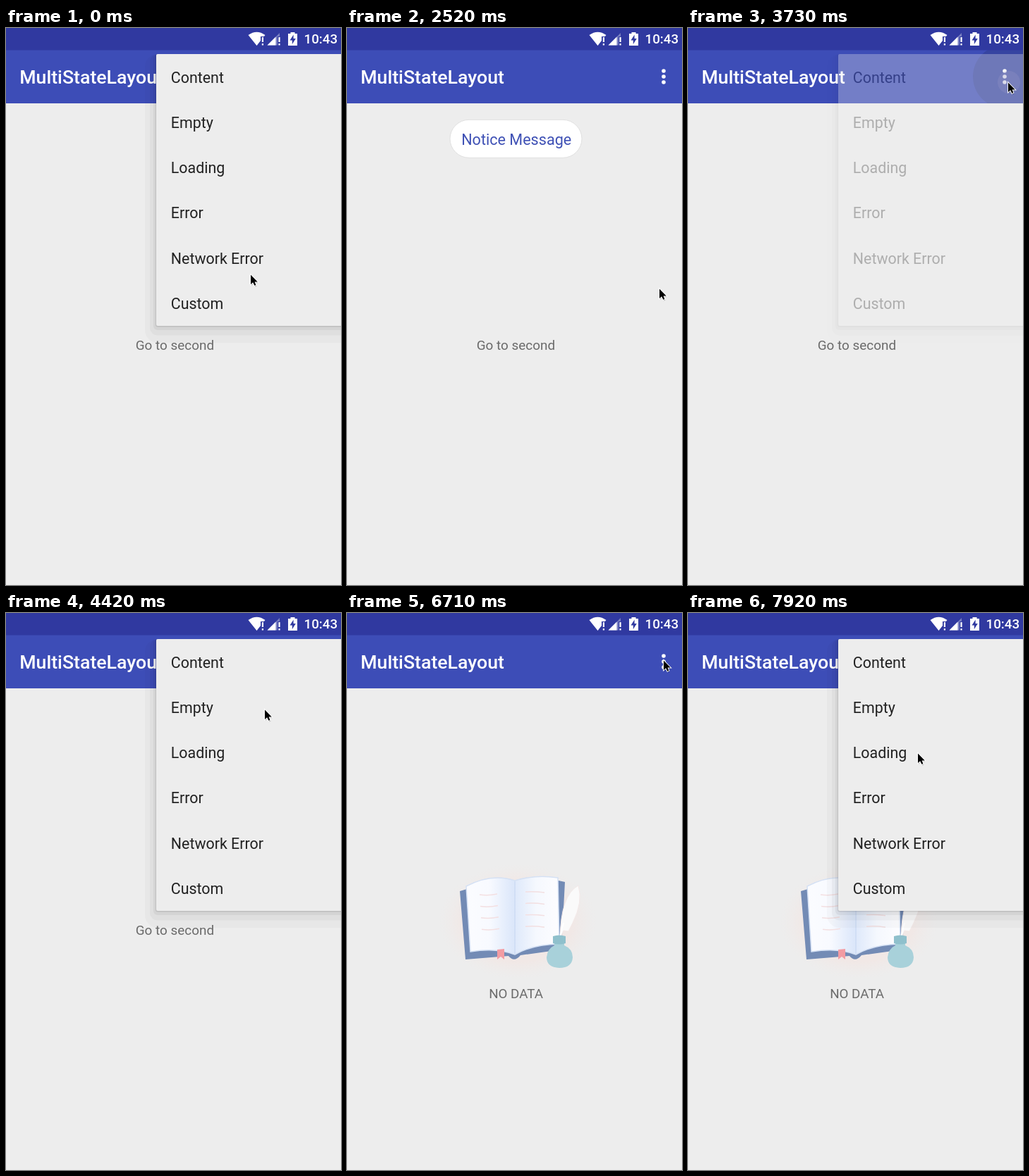
These frames come from a looping animation (475 by 791 pixels, 8 s). An HTML page:

```html
<!DOCTYPE html>
<html lang="en">
<head>
<meta charset="utf-8">
<title>MultiStateLayout</title>
<style>
  html, body { margin: 0; width: 100%; height: 100%; overflow: hidden; background: #ededed; }
  svg { display: block; width: 100%; height: 100%; font-family: Roboto, sans-serif; }
  .mid { text-anchor: middle; }
</style>
</head>
<body>
<svg viewBox="0 0 475 791">
  <defs>
    <radialGradient id="glow">
      <stop offset=".7" stop-color="#f1e8e6"/>
      <stop offset="1" stop-color="#efebea" stop-opacity="0"/>
    </radialGradient>
    <linearGradient id="page">
      <stop offset="0" stop-color="#fbfcff"/>
      <stop offset=".25" stop-color="#f8faff"/>
      <stop offset=".5" stop-color="#dce7fa"/>
      <stop offset=".75" stop-color="#f5f8fe"/>
      <stop offset="1" stop-color="#fdfdff"/>
    </linearGradient>
    <clipPath id="bar"><rect y="31.5" width="475" height="75.5"/></clipPath>
  </defs>

  <rect width="475" height="791" fill="#ededed"/>

  <!-- content state -->
  <text id="home" class="mid" x="239.4" y="456.8" font-size="18.9" fill="#6b6b6b">Go to second</text>
  <g id="notice">
    <rect x="-93.5" y="-27" width="187" height="54" rx="27" fill="#fff" stroke="#e0e0e0"/>
    <text id="label" class="mid" x=".7" y="8.3" font-size="21.6" fill="#3f51b5">Notice Message</text>
  </g>

  <!-- empty state -->
  <g id="empty">
    <ellipse cx="242" cy="438" rx="112" ry="82" fill="url(#glow)"/>
    <path d="M160 395L170 392 300 380 309 382 304 478 246 486Q237 497 229 487L168 492Z" fill="#738bb5"/>
    <path d="M169 388Q205 369 238 380Q268 371 299 376L301 470Q262 471 238 485Q212 475 175 481Z" fill="url(#page)" stroke="#d5e1f4" stroke-width="1.5"/>
    <path d="M238 381V484" stroke="#c3d4f0"/>
    <g id="lines" stroke="#f3dfe1" stroke-width="1.5" fill="none"/>
    <path d="M213 478L223 477V492L218 488 213 492Z" fill="#f29ca3"/>
    <path d="M302 463Q303 400 328 387Q335 410 320 440L314 452 307 451Z" fill="#fafafa" stroke="#f3e9e8"/>
    <path d="M301 463L307 440" stroke="#fff" stroke-width="2"/>
    <path d="M294 464H308V472Q320 477 320 489Q319 504 301 504Q283 503 283 489Q284 477 294 472Z" fill="#a8d1da"/>
    <path d="M292 459Q301 456 310 459V469Q301 472 292 469Z" fill="#8fc0cc"/>
    <text class="mid" x="239.6" y="547" font-size="18.8" fill="#6b6b6b">NO DATA</text>
  </g>

  <!-- app bar -->
  <rect width="475" height="107" fill="#3d4db7"/>
  <rect width="475" height="31.5" fill="#3039a0"/>
  <text x="19.2" y="79.3" font-size="26.7" font-weight="500" fill="#fff">MultiStateLayout</text>
  <circle id="ripple" cx="449" cy="69" r="45" opacity=".12" clip-path="url(#bar)"/>
  <path d="M449 61v0m0 8v0m0 8v0" stroke="#fff" stroke-width="5.6" stroke-linecap="round"/>
  <g fill="#fff">
    <path d="M343.5 10Q355.5 1.5 367.5 10L365.8 12H361V18L355.5 25Z"/>
    <path d="M370.5 24.5L388 7V12H385V24.5Z" opacity=".35"/>
    <path d="M370.5 24.5L382.5 12.5V24.5Z"/>
    <path id="mark" d="M362.8 13h2.2v7h-2.2zm0 9h2.2v2.4h-2.2z"/>
    <use href="#mark" x="23.6"/>
    <path d="M400 8H403.5V6H409.5V8H413V25H400Z"/>
    <path d="M407.6 9.5L402.5 17.5H405.8V23L410.8 15H407.6Z" fill="#3039a0"/>
    <text x="422.5" y="22.3" font-size="18.8" font-weight="500">10:43</text>
  </g>

  <g id="menu"></g>

  <circle id="press" r="16" fill="#9696c8" opacity=".3"/>
  <g id="cursor">
    <path d="M1 2V17L4.5 14 7 19 9.5 18 7.2 13H12Z" opacity=".2"/>
    <path d="M0 0V15L3.5 12 6 17 8.2 16 6.2 11.2H10.8Z" stroke="#fff" stroke-width="2" paint-order="stroke"/>
  </g>
</svg>
<script>
const $ = id => document.getElementById(id);
const LOOP = 8000;

// Menu panel: growing shadow layers, surface, items
const layers = [4, 3, 2, 1].map(i => {
  const side = i * i, drop = side * 1.5;
  return `<rect x="${213 - side}" y="37" width="300" height="${386 + drop}" rx="${side + 2}" opacity="${.1 / i}"/>`;
});
const items = ['Content', 'Empty', 'Loading', 'Error', 'Network Error', 'Custom'].map((name, i) =>
  `<text x="233.8" y="${77.5 + i * 64.3}" font-size="21.4" fill="#212121">${name}</text>`);
$('menu').innerHTML = layers.join('') +
  '<rect x="213" y="37" width="270" height="386" rx="2" fill="#ededed"/>' + items.join('');

// Writing on the book pages
$('lines').innerHTML = [0, 1, 2, 3].map(i => {
  const y = 400 + i * 16.4;
  return `<path d="M${188 + i} ${y}q12 2 25 -1M253 ${y - 4}q13 -1 27 1"/>`;
}).join('');

// Pointer trips: start, end, destination
const trips = [
  [0, 290, 337, 383],
  [835, 1020, 490, 395],
  [2519, 2520, 443, 370],
  [2570, 3230, 454, 77],
  [4080, 4420, 367, 137],
  [6130, 6700, 449, 67],
  [7450, 7920, 326, 199]
];
const opens = [3340, 6830];  // clicks on the overflow button
const picks = [460, 4980];   // clicks on a menu item

const ramp = (t, a, b) => Math.min(1, Math.max(0, (t - a) / (b - a)));
const smooth = u => u * u * (3 - 2 * u);
const since = (clicks, t, from, to) => clicks.some(c => t >= c + from && t < c + to);

const pointer = t => trips.reduce(([x, y], [a, b, toX, toY]) => {
  const u = smooth(ramp(t, a, b));
  return [x + (toX - x) * u, y + (toY - y) * u];
}, [347, 350]);

const menuAlpha = t => 1
  - picks.reduce((sum, c) => sum + ramp(t, c + 180, c + 320), 0)
  + ramp(t, 3670, 3870) + ramp(t, 6980, 7180);

const fade = (id, a) => $(id).setAttribute('opacity', a);
const move = (id, x, y, s = 1) => $(id).setAttribute('transform', `translate(${x} ${y}) scale(${s})`);
const show = (id, on) => { $(id).style.display = on ? '' : 'none'; };

function draw(now) {
  const t = now % LOOP;
  const [x, y] = pointer(t);
  const size = ramp(t, 630, 970) - ramp(t, 3550, 3700);
  move('cursor', x, y + .5, .9);
  move('press', x + 1, y);
  move('notice', 239.5, 157.3, size);
  fade('notice', size);
  fade('label', ramp(size, .4, 1));
  fade('menu', menuAlpha(t));
  fade('home', 1 - ramp(t, 5190, 5330));
  fade('empty', ramp(t, 5220, 5500));
  show('press', since(picks, t, 0, 190) || since(opens, t, 0, 450));
  show('ripple', since(opens, t, 200, 600));
  requestAnimationFrame(draw);
}
draw(0);
</script>
</body>
</html>
```
